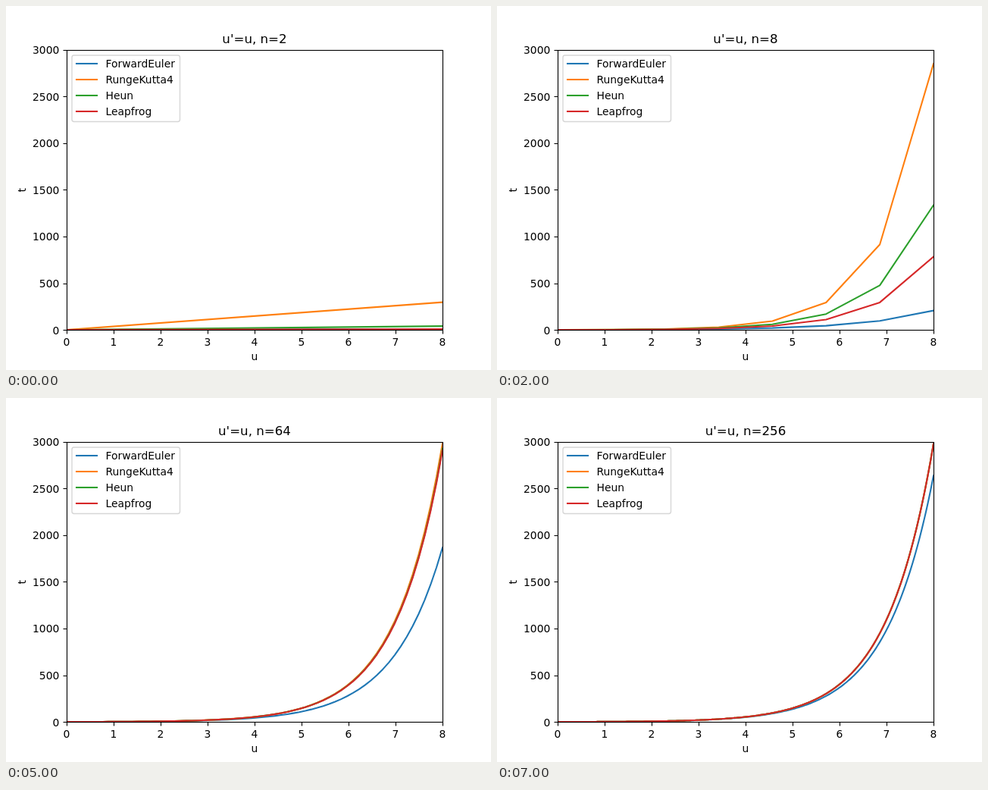
Write an HTML page with a canvas that moves like this. It is 640x480 px and loops after 8 s.

```html
<!DOCTYPE html>
<html lang="en">
<head>
<meta charset="utf-8">
<title>Integrators for u'=u</title>
<style>
  html, body { margin: 0; width: 100%; height: 100%; overflow: hidden; background: #fff; }
  canvas { display: block; width: 640px; height: 480px; }
</style>
</head>
<body>
<canvas id="plot" width="640" height="480"></canvas>
<script>
const ctx = document.getElementById('plot').getContext('2d');
const STEP_MS = 1000, STEPS = 8, END = 8;
const LEFT = 80, RIGHT = 576, TOP = 57.6, BOTTOM = 427.2;
const PT = 100 / 72;
const px = t => LEFT + t / END * (RIGHT - LEFT);
const py = u => BOTTOM - u / 3000 * (BOTTOM - TOP);

// Each method advances u'=u by one step h; prev is the value before u.
const methods = [
  { name: 'ForwardEuler', color: '#1f77b4', next: (u, h) => u * (1 + h) },
  { name: 'RungeKutta4', color: '#ff7f0e',
    next: (u, h) => u * (1 + h + h ** 2 / 2 + h ** 3 / 6 + h ** 4 / 24) },
  { name: 'Heun', color: '#2ca02c', next: (u, h) => u * (1 + h + h * h / 2) },
  { name: 'Leapfrog', color: '#d62728',
    next: (u, h, prev) => prev === undefined ? u * (1 + h) : prev + 2 * h * u },
];

function solve(next, n) {
  const h = END / (n - 1), values = [1];
  while (values.length < n) {
    const i = values.length;
    values.push(next(values[i - 1], h, values[i - 2]));
  }
  return values;
}

function stroke(points, color, width, cap = 'butt') {
  ctx.beginPath();
  points.forEach(([x, y]) => ctx.lineTo(x, y));
  ctx.strokeStyle = color;
  ctx.lineWidth = width;
  ctx.lineCap = cap;
  ctx.lineJoin = 'round';
  ctx.stroke();
}

function label(text, x, y, align = 'center', size = 10) {
  ctx.font = `${size * PT}px "DejaVu Sans", sans-serif`;
  ctx.textAlign = align;
  ctx.fillStyle = '#000';
  ctx.fillText(text, x, y);
}

function drawCurves(n) {
  ctx.save();
  ctx.beginPath();
  ctx.rect(LEFT, 58, RIGHT - LEFT, 370);
  ctx.clip();
  for (const { color, next } of methods) {
    const points = solve(next, n).map((u, i) => [px(i * END / (n - 1)), py(u)]);
    stroke(points, color, 1.5 * PT, 'square');
  }
  ctx.restore();
}

function drawAxes() {
  const line = 0.8 * PT;
  for (let t = 0; t <= END; t++) {
    const x = px(t) + 0.5;
    stroke([[x, 427.5], [x, 432.5]], '#000', line);
    label(t, px(t), 448);
  }
  for (let u = 0; u <= 3000; u += 500) {
    const y = Math.round(py(u)) + 0.5;
    stroke([[75.5, y], [80.5, y]], '#000', line);
    label(u, 70.3, Math.round(py(u) + 5.35), 'right');
  }
  ctx.strokeStyle = '#000';
  ctx.lineWidth = line;
  ctx.lineJoin = 'miter';
  ctx.strokeRect(80.5, 58.5, 496, 369);
  label('u', 328, 467);
  ctx.save();
  ctx.translate(26, 242.9);
  ctx.rotate(-Math.PI / 2);
  label('t', 0, 0);
  ctx.restore();
}

function drawLegend() {
  ctx.beginPath();
  ctx.roundRect(87, 65, 142.5, 87.5, 2.8);
  ctx.fillStyle = 'rgba(255,255,255,0.8)';
  ctx.fill();
  ctx.strokeStyle = 'rgba(204,204,204,0.8)';
  ctx.lineWidth = PT;
  ctx.stroke();
  methods.forEach(({ name, color }, i) => {
    const y = 76 + 21 * i;
    stroke([[93, y], [120, y]], color, 1.5 * PT, 'square');
    label(name, 131.5, y + 5, 'left');
  });
}

function draw(now) {
  const n = 2 ** (1 + Math.floor(now / STEP_MS) % STEPS);
  ctx.fillStyle = '#fff';
  ctx.fillRect(0, 0, 640, 480);
  drawCurves(n);
  drawAxes();
  label(`u'=u, n=${n}`, 328, 49, 'center', 12);
  drawLegend();
}

let start;
function tick(now) {
  start ??= now;
  draw(now - start);
  requestAnimationFrame(tick);
}
draw(0);
requestAnimationFrame(tick);
</script>
</body>
</html>
```
